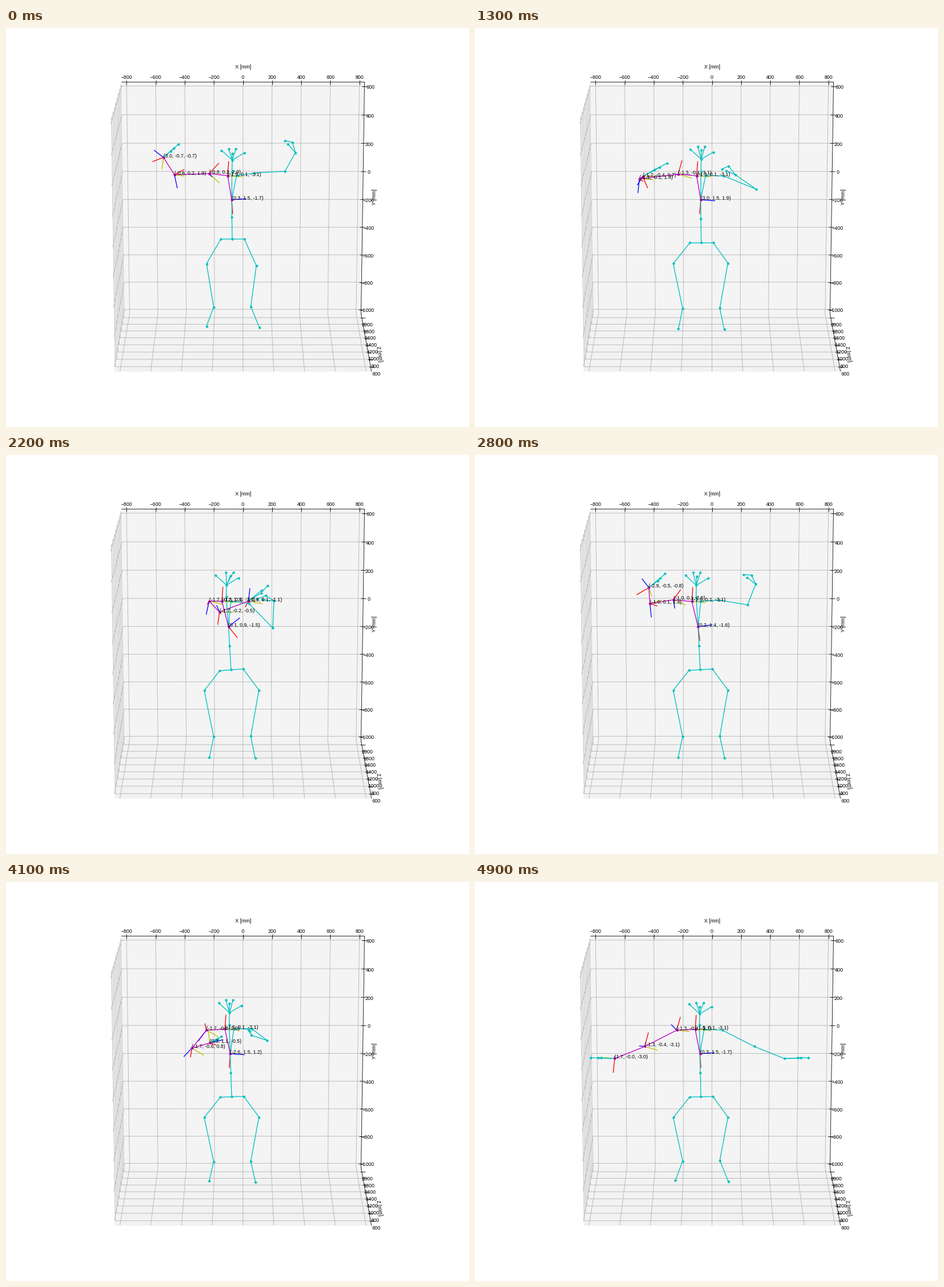
Recreate the animation shown at these times as a matplotlib script. Size 800 by 690 pixels, loop 5 s.

```python
import math

import matplotlib.pyplot as plt
import numpy as np
from matplotlib.animation import FuncAnimation

W, H, DPI = 800, 690, 100
FRAMES, STEP = 50, 100
PT = 72 / DPI  # points per pixel
AXIS_LENGTH = 25
plt.rcParams["font.family"] = "Liberation Sans"
CYAN, MAGENTA, YELLOW = (0, .75, .75), (.75, 0, .75), (.75, .75, 0)

CHAINS = [
    "pelvis navel chest neck head nose", "r_eye head l_eye", "r_ear head l_ear",
    "r_foot r_ankle r_knee r_hip pelvis l_hip l_knee l_ankle l_foot",
    "chest l_clav l_shoulder l_elbow l_wrist l_hand l_tip", "l_wrist l_thumb",
    "r_wrist r_hand r_tip", "r_wrist r_thumb",
]
TRACKED = ["chest", "r_clav", "r_shoulder", "r_elbow", "r_wrist"]
PLAIN = sorted(set(" ".join(CHAINS).split()) - set(TRACKED))


def folded(right, left, turns):
    """Arm bones from shoulder to fingertip, x + y*j, and the joint turns."""
    return np.array(right + left), np.array(turns)


def wide(degrees):
    """Both arms stretched out, raised by an angle."""
    left = np.array([62, 56, 23, 18]) * np.exp(-1j * np.radians(degrees + np.array([0, 5, 30, 28])))
    level = np.array([-.11, -1.13, .04, 3.36, 3.03, 1.83, -.5, 3.2])
    change = np.array([-14, 6, 16, -8.2, -5.7, 6, -18, -4]) / 1000
    return np.concatenate([-left.conj(), left]), level + degrees * change


# Turns: chest yaw, three of the upper arm, elbow roll, three of the wrist.
HANDS_UP = folded([-60 + 2j, -19 - 30j, 13 - 11j, 13 - 12j],
                  [52 - 3j, 18 - 32j, -5 - 18j, -13 - 3j],
                  [.3, -.8, .2, 2.9, 1.9, 3, -.7, -.7])
ELBOWS_OUT = folded([-60 + 10j, 30 - 22j, 11 - 19j, 15 + 9j],
                    [48 + 31j, 12 - 37j, 2 - 22j, -17],
                    [.1, -1.1, -.3, 2.8, 1, -2.3, -.5, -.9])
FORWARD = folded([-67 + 8j, 6 - 4j, 20 - 12j, 22 - 11j],
                 [56 + 23j, -36 - 25j, -12 - 15j, -11 + 5j],
                 [3, -1.3, -.1, 3.1, 1.4, -1.2, -.4, .7])
REACH_ACROSS = folded([18 + 19j, 50 - 19j, 22 - 14j, 11 - 13j],
                      [41 + 42j, 2 - 47j, -14 - 9j, -15 + 6j],
                      [.1, -1.7, -.2, 1.3, -.5, -1.8, .1, -1.1])
CROSSED = folded([-25 + 31j, 31 - 9j, 10 - 5j, 10 - 6j],
                 [26 + 20j, -27 - 9j, -3 - 7j, -3 - 4j],
                 [-2.6, -1.7, -.6, 2, .8, .3, 1.1, -.5])
ROUTINE = {
    0: HANDS_UP, 500: ELBOWS_OUT, 1300: FORWARD, 2200: REACH_ACROSS, 3000: HANDS_UP,
    3200: wide(41), 3400: wide(22), 3600: wide(2), 4100: CROSSED,
    4500: wide(43), 4700: wide(5), 4900: wide(-27),
}
TIMES = list(ROUTINE)
ARM_KEYS = np.array([arms for arms, _ in ROUTINE.values()])
TURN_KEYS = np.unwrap([turns for _, turns in ROUTINE.values()], axis=0)


def blend(keys, now):
    return [np.interp(now, TIMES, column) for column in keys.T]


def bump(now, centre):
    return math.exp(-((now - centre) / 400) ** 2)


def add_arm(pose, prefix, side, bones):
    elbow, wrist, hand, tip = bones
    inward = max(0, -side * elbow.real)
    shoulder = pose["neck"] + side * (39.5 - .55 * inward) + 1j * (3.5 + .2 * elbow.imag)
    joints = np.cumsum([shoulder, elbow, wrist, hand, tip])
    pose.update(zip([prefix + n for n in ("shoulder", "elbow", "wrist", "hand", "tip")], joints))
    pose[prefix + "thumb"] = joints[2] + .7 * (hand + tip)


def body(now):
    start, lift, end = bump(now, 0), bump(now, 3400), bump(now, 4900)
    look = 7 * bump(now, 2200) - 4 * lift
    nod = 4 * (start + end) + 7 * lift
    lean = np.interp(now, [1300, 2200, 4900], [0, 1, .25])
    crouch = math.sin(math.pi * now / 4900) ** 2
    stride = start + lift + end

    pelvis = 390.3 - 2 * lean + 1j * (371 - 6.5 * start - 2.5 * lift)
    chest = 389.5 - 5.5 * lean + 296.5j
    neck = 390 - 10 * lean + 1j * (247.3 - 2.5 * lean)
    head = 390.3 - 10 * lean + 1j * (226.5 - 2 * lean + 1.5 * (start + end))
    eyes = head + .8 * look + 1j * (.8 * nod - 22.5)
    pose = {
        "pelvis": pelvis, "navel": chest + .44 * (pelvis - chest), "chest": chest,
        "neck": neck, "r_clav": neck - 7.5 + 7.7j, "l_clav": neck + 8 + 7.3j,
        "head": head, "nose": head + look + 1j * (nod - 16),
        "r_eye": eyes - 6, "l_eye": eyes + 6.5,
        "r_ear": head - 18.5 - 17j, "l_ear": head + 21 - 12.5j,
        "r_hip": pelvis - 19.5 + 1.5j * lean, "l_hip": pelvis + 21 - 1.5j * lean,
        "r_knee": 342 + 4 * start + 1j * (407 - 5 * lift),
        "l_knee": 436.5 - 4.5 * start + 1j * (406 + 4.5 * start),
        "r_ankle": 358.3 + 1j * (482 + 5 * crouch), "l_ankle": 422.5 + 1j * (481 + 5 * crouch),
        "r_foot": 351 - 5 * stride + 1j * (515 + 8 * crouch),
        "l_foot": 430 + 7 * stride + 1j * (517 + 7 * crouch),
    }
    arms = blend(ARM_KEYS, now)
    add_arm(pose, "r_", -1, arms[:4])
    add_arm(pose, "l_", 1, arms[4:])

    yaw, a, b, upper, lower, *wrist = blend(TURN_KEYS, now)
    turns = {
        "chest": (yaw, 1.5 - .6 * bump(now, 2200), -1.4 - yaw),
        "r_clav": (-1.5, .1 + .2 * lift, -3.1),
        "r_shoulder": (a, b, upper), "r_elbow": (a, b, lower), "r_wrist": tuple(wrist),
    }
    return pose, turns


def local_axes(a, b, c):
    """Project the three unit axes of a joint onto the screen."""
    for x, y, z in ((math.cos(a), math.sin(a), 0), (-math.sin(a), math.cos(a), 0), (0, 0, 1)):
        depth = z * math.cos(b) - x * math.sin(b)
        across = x * math.cos(b) + z * math.sin(b)
        yield AXIS_LENGTH * (across + 1j * (depth * math.sin(c) - y * math.cos(c)))


def turn_text(turns):
    wrapped = [(t + math.pi) % math.tau - math.pi for t in turns]
    return "(" + ", ".join(f"{t:.1f}" for t in wrapped) + ")"


fig = plt.figure(figsize=(W / DPI, H / DPI), dpi=DPI, facecolor="white")
ax = fig.add_axes([0, 0, 1, 1])
ax.set_xlim(-.5, W - .5)
ax.set_ylim(H - .5, -.5)
ax.axis("off")


def line(points, color, width, z):
    xs, ys = zip(*points)
    return ax.plot(xs, ys, color=color, lw=width * PT, zorder=z, solid_capstyle="butt")[0]


def dots(color, z):
    return ax.plot([], [], "o", color=color, ms=4.3 * PT, mew=0, zorder=z)[0]


def label(x, y, text, **style):
    style = {"ha": "center", "va": "center", **style}
    return ax.text(x, y, text, fontsize=8.8 * PT, color="black", zorder=9, **style)


def lerp(a, b, t):
    return a[0] + (b[0] - a[0]) * t, a[1] + (b[1] - a[1]) * t


def signed(value):
    return str(value).replace("-", "\u2212")


def draw_box():
    top_l, top_r = (199, 93), (619, 93)
    low_l, low_r = (204.5, 493.5), (613, 493.5)
    front_l, front_r, front_top = (187, 593.5), (631, 593.5), (180.5, 158)
    panes = [((top_l, low_l, front_l, front_top), "#f9f9f9"),
             ((low_l, low_r, front_r, front_l), "#f2f2f2"),
             ((top_l, top_r, low_r, low_l), "#f4f4f4")]
    for corners, color in panes:
        ax.fill(*zip(*corners), color=color, lw=.5, zorder=0)

    def grid(*points):
        line(points, "#b0b0b0", .8, 1)

    def tick(x, y, dx, dy):
        line([(x - dx, y - dy), (x + dx, y + dy)], "black", .8, 2)

    for value in range(-800, 801, 200):
        u = (value + 835) / 1670
        x, y = lerp(top_l, top_r, u)
        grid((x, y), lerp(low_l, low_r, u), lerp(front_l, front_r, u))
        tick(x, y, 0, 4)
        label(x, 84.5, signed(value))

    for value in range(600, -1001, -200):
        y = 247.5 - .24308 * value - 4.58e-6 * value ** 2
        t = (y - 93) / 400.5
        x, y = lerp(top_r, low_r, t)
        grid(lerp(front_top, front_l, t), lerp(top_l, low_l, t), (x, y))
        tick(x, y, 4.5, 0)
        label(x + 10.3, y + 2, signed(value))

    for k in range(8):
        s = (7 + 11.2 * k + .13 * k * k) / 100
        x, y = lerp(low_r, front_r, s)
        grid(lerp(top_l, front_top, s), lerp(low_l, front_l, s), (x, y))
        tick(x + 1.5, y, 4.5, 0)
        label(x + 10, y + 12.7, str(2000 - 200 * k))

    line([top_l, top_r, low_r, front_r], "black", .8, 2)
    label(409, 67, "X [mm]")
    label(636, 292, "Y [mm]", rotation=89)
    label(644.5, 563, "Z [mm]", rotation=-80)


draw_box()
bones = [line([(0, 0)], CYAN, 1.3, 4) for _ in CHAINS]
arm = line([(0, 0)], MAGENTA, 1.3, 6)
plain_dots, arm_dots = dots(CYAN, 5), dots(MAGENTA, 7)
arrows = {name: [line([(0, 0)], color, 1.3, 3) for color in ("red", YELLOW, "blue")]
          for name in TRACKED}
captions = {name: label(0, 0, "", ha="left", va="baseline") for name in TRACKED}


def place(artist, points):
    points = np.array(points)
    artist.set_data(points.real, points.imag)


def update(frame):
    pose, turns = body(frame * STEP)
    for artist, chain in zip(bones, CHAINS):
        place(artist, [pose[n] for n in chain.split()])
    for artist in (arm, arm_dots):
        place(artist, [pose[n] for n in TRACKED])
    place(plain_dots, [pose[n] for n in PLAIN])
    for name in TRACKED:
        joint = pose[name]
        for artist, axis in zip(arrows[name], local_axes(*turns[name])):
            place(artist, [joint, joint + axis])
        captions[name].set_position((joint.real, joint.imag))
        captions[name].set_text(turn_text(turns[name]))
    return [*bones, arm, plain_dots, arm_dots, *sum(arrows.values(), []), *captions.values()]


animation = FuncAnimation(fig, update, frames=FRAMES, interval=STEP, repeat=True, repeat_delay=0)
plt.show()
```
